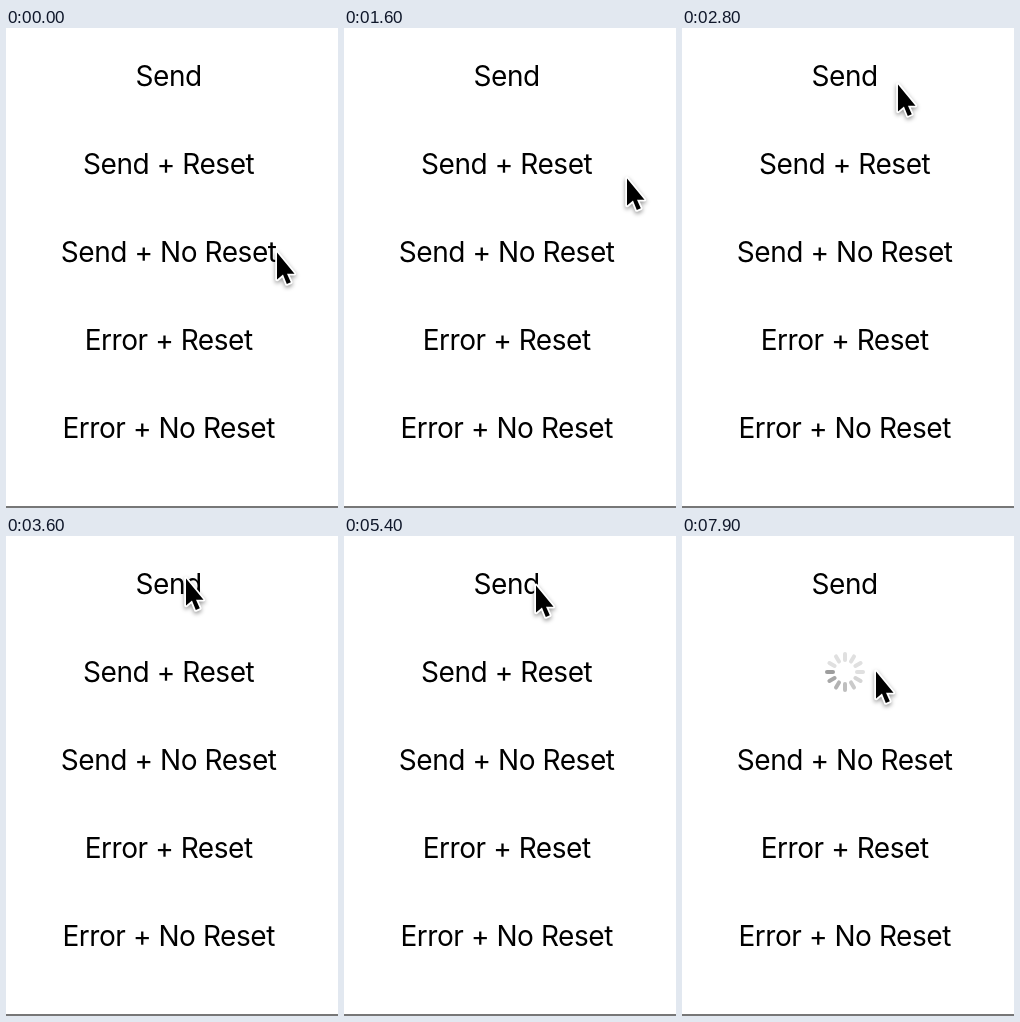
Write an HTML page that moves like this. It is 332 px wide and 480 px high and loops after 8000 ms.

```html
<!DOCTYPE html>
<html lang="en">
<head>
<meta charset="utf-8">
<title>Send buttons</title>
<style>
  html, body { margin: 0; width: 100%; height: 100%; overflow: hidden; background: #fff; }
  svg { display: block; width: 332px; height: 480px; }
  text { font: 28px Inter, "Liberation Sans", sans-serif; letter-spacing: -0.43px; text-anchor: middle; }
  #cursor { filter: drop-shadow(0 2px 2px rgba(0, 0, 0, .4)); }
</style>
</head>
<body>
<svg viewBox="0 0 332 480">
  <rect width="332" height="480" fill="#fff"/>
  <g id="labels"></g>
  <g id="spinner"></g>
  <rect y="478" width="332" height="2" fill="#777"/>
  <path id="cursor" d="M0 .5V27.5L6 22.5L9.8 32L13.8 30.3L10 21.8H17.5Z"
        stroke="#fff" stroke-width="3.6" stroke-linejoin="round" paint-order="stroke"/>
</svg>
<script>
const LOOP = 8000, TICK = 100, SPOKES = 12;
const CENTER = 163, FIRST_ROW = 48, ROW_GAP = 88;
const LABELS = ['Send', 'Send + Reset', 'Send + No Reset', 'Error + Reset', 'Error + No Reset'];

// Periods in which a row shows the spinner instead of its label
const BUSY = [
  { row: 0, start: 4400, end: 5400 },
  { row: 1, start: 7900, end: 8000 },
];

// Key points [time, x, y] of the two pointer strokes; the pointer rests between them
const UP = [
  [300, 271, 224], [1000, 282, 203], [1600, 283, 150],
  [2100, 263, 89], [2500, 237, 66], [3500, 180, 42],
];
const DOWN = [[5200, 180, 42], [5400, 192, 49], [6000, 209, 96], [6600, 194, 135]];

const byId = id => document.getElementById(id);

function add(parent, tag, attrs) {
  const node = document.createElementNS('http://www.w3.org/2000/svg', tag);
  for (const key in attrs) node.setAttribute(key, attrs[key]);
  return parent.appendChild(node);
}

const rowY = row => FIRST_ROW + row * ROW_GAP;

const labels = LABELS.map((label, row) => {
  const node = add(byId('labels'), 'text', { x: CENTER - 0.3, y: rowY(row) + 10 });
  node.textContent = label;
  return node;
});

const spokes = Array.from({ length: SPOKES }, (_, i) =>
  add(byId('spinner'), 'rect', {
    x: -20, y: -2, width: 10, height: 4, rx: 2,
    transform: `rotate(${-i * 360 / SPOKES})`,
  }));

// Smooth curve through the points, at rest at both ends
function glide(points, time) {
  const last = points.length - 1;
  const t = Math.min(Math.max(time, points[0][0]), points[last][0]);
  const i = Math.max(1, points.findIndex(point => point[0] >= t));
  const a = points[i - 1], b = points[i];
  const span = b[0] - a[0], s = (t - a[0]) / span, r = 1 - s;
  const slope = (k, axis) => {
    if (k === 0 || k === last) return 0;
    const before = points[k - 1], after = points[k + 1];
    return (after[axis] - before[axis]) / (after[0] - before[0]);
  };
  return [1, 2].map(axis =>
    r * r * (1 + 2 * s) * a[axis] + s * s * (1 + 2 * r) * b[axis] +
    span * s * r * (r * slope(i - 1, axis) - s * slope(i, axis)));
}

function drawSpinner(busy, time) {
  byId('spinner').setAttribute('visibility', busy ? 'visible' : 'hidden');
  if (!busy) return;
  byId('spinner').setAttribute('transform', `translate(${CENTER} ${rowY(busy.row)})`);
  const active = Math.floor((time - busy.start) * SPOKES / 1000);
  spokes.forEach((spoke, i) => {
    const fade = Math.min(1, (i + active) % SPOKES / 6);
    const gray = Math.round(157 + 67 * fade);
    spoke.setAttribute('fill', `rgb(${gray},${gray},${gray})`);
  });
}

function render(now) {
  const time = Math.floor(now % LOOP / TICK) * TICK;
  const busy = BUSY.find(b => time >= b.start && time < b.end);
  labels.forEach((label, row) =>
    label.setAttribute('visibility', busy && busy.row === row ? 'hidden' : 'visible'));
  drawSpinner(busy, time);
  const tip = glide(time < DOWN[0][0] ? UP : DOWN, time);
  byId('cursor').setAttribute('transform', `translate(${tip})`);
}

let origin;
function frame(now) {
  origin ??= now;
  render(now - origin);
  requestAnimationFrame(frame);
}
render(0);
requestAnimationFrame(frame);
</script>
</body>
</html>
```
